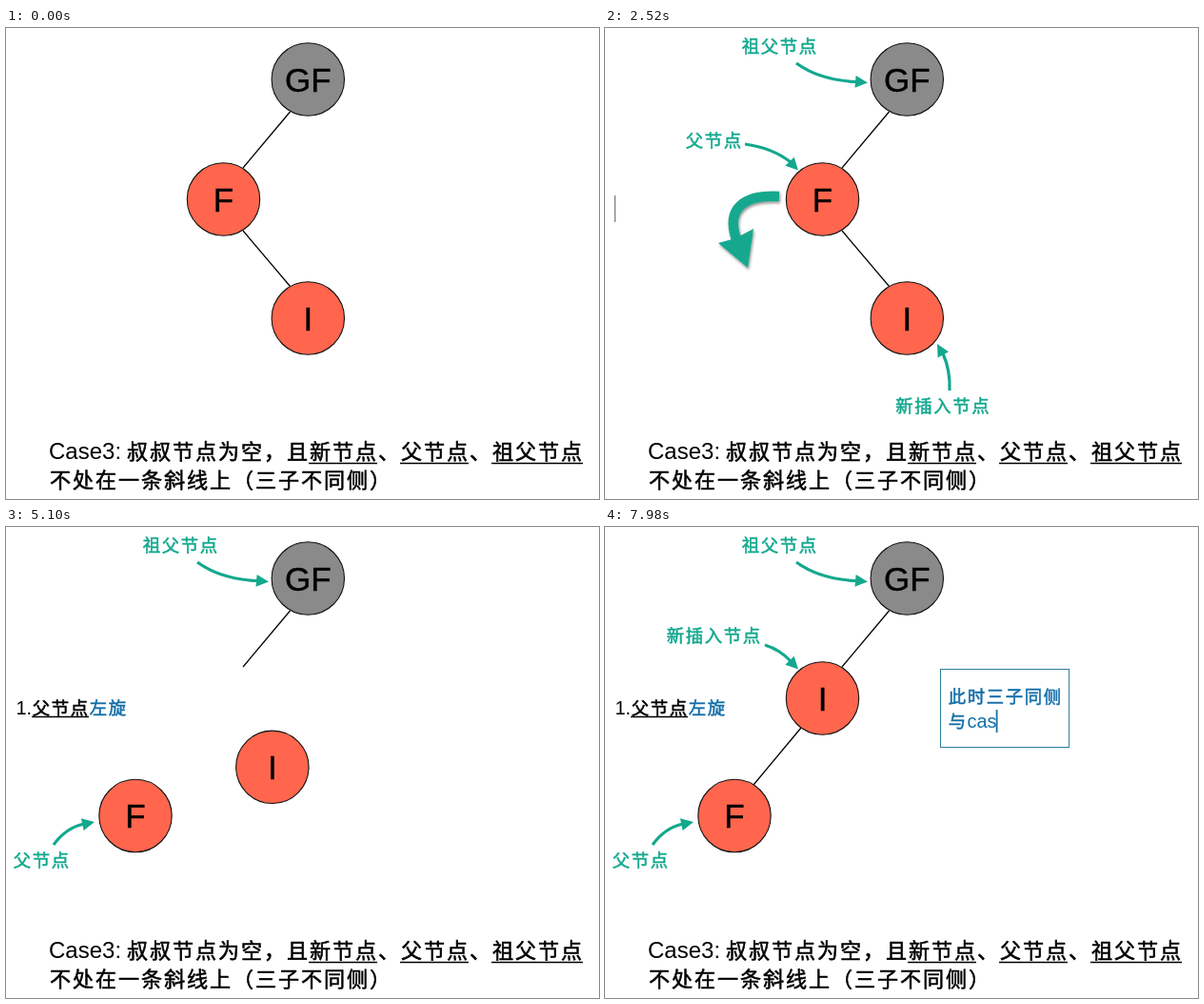
Animation of 623 by 495 pixels, one loop 8 s. Source, as an HTML page:

```html
<!DOCTYPE html>
<html lang="zh-CN">
<head>
<meta charset="utf-8">
<title>红黑树插入</title>
<style>
  html, body { margin: 0; width: 100%; height: 100%; overflow: hidden; background: #fff; }
  svg { display: block; width: 623px; height: 495px; }
  .cjk { font-family: "Noto Sans CJK SC", "Noto Sans CJK", "Noto Sans SC", sans-serif; white-space: pre; }
  .latin { font-family: "Liberation Sans", Arial, sans-serif; }
</style>
</head>
<body>
<svg id="stage" viewBox="0 0 623 495">
  <defs>
    <filter id="soft" x="-40%" y="-40%" width="180%" height="180%"><feGaussianBlur stdDeviation="9"/></filter>
    <filter id="shade" x="-30%" y="-30%" width="160%" height="160%">
      <feDropShadow dx="1" dy="2" stdDeviation="1.8" flood-color="#000" flood-opacity=".45"/>
    </filter>
  </defs>
</svg>
<script>
const LOOP = 8000, STEP = 60;
const TEAL = '#13a88e', BLUE = '#146fa9', RED = '#ff664d', GRAY = '#8a8a8a';
const stage = document.getElementById('stage');

function add(parent, tag, attrs = {}, text) {
  const el = document.createElementNS('http://www.w3.org/2000/svg', tag);
  for (const key in attrs) el.setAttribute(key, attrs[key]);
  if (text) el.textContent = text;
  return parent.appendChild(el);
}
const group = () => add(stage, 'g');
const line = (parent, x1, y1, x2, y2, stroke = '#000', width = 1.3) =>
  add(parent, 'line', { x1, y1, x2, y2, stroke, 'stroke-width': width });

// Chinese glyphs sit centred in square cells of the given pitch.
function cjk(parent, x, cy, str, pitch, fill) {
  const size = pitch * 0.92;
  return add(parent, 'text', {
    class: 'cjk', x: x + pitch * 0.04, y: cy + size * 0.38, fill, stroke: fill, 'stroke-width': 0.55,
    'font-size': size, 'letter-spacing': pitch - size
  }, str);
}
const latin = (parent, x, y, str, size, fill, extra = {}) =>
  add(parent, 'text', { class: 'latin', x, y, fill, 'font-size': size, ...extra }, str);

function label(text, x, cy, body, tipX, tipY, angle, centerX, centerY) {
  const el = group();
  cjk(el, x, cy, text, 20, TEAL);
  add(el, 'path', { d: body, fill: 'none', stroke: TEAL, 'stroke-width': 3.2 });
  add(el, 'path', { d: 'M0 0L-13 -6.5L-13 6.5Z', fill: TEAL, transform: `translate(${tipX} ${tipY}) rotate(${angle})` });
  return { el, centerX, centerY };
}

function node(text, fill) {
  const el = group();
  add(el, 'circle', { r: 38.2, fill, stroke: '#111', 'stroke-width': 1.1 });
  latin(el, 0, 12.7, text, 35, '#000', { 'text-anchor': 'middle', stroke: '#000', 'stroke-width': 0.4 });
  return el;
}

const clamp = v => Math.max(0, Math.min(1, v));
const part = (t, start, length) => clamp((t - start) / length);
const ease = p => (1 - Math.cos(Math.PI * p)) / 2;
const mix = (a, b, p) => a + (b - a) * p;
const fade = (el, value) => el.setAttribute('opacity', value);
const place = (el, x, y) => el.setAttribute('transform', `translate(${x} ${y})`);

// Springy entrance: overshoot, slight undershoot, rest.
function popScale(p) {
  if (p < 0.45) return 1.09 * Math.sin(p / 0.45 * Math.PI / 2);
  if (p < 0.75) return mix(1.09, 0.96, ease((p - 0.45) / 0.3));
  return mix(0.96, 1, ease((p - 0.75) / 0.25));
}
function pop({ el, centerX, centerY }, t, start) {
  const s = popScale(part(t, start, 500));
  el.setAttribute('transform', `translate(${centerX} ${centerY}) scale(${s}) translate(${-centerX} ${-centerY})`);
  fade(el, s > 0 ? 1 : 0);
}

function makeSmoke(x, y, rx, ry, tilt) {
  const el = group();
  const cloud = add(el, 'ellipse', { rx, ry, fill: '#d5dddd', filter: 'url(#soft)' });
  return t => {
    const s = mix(0.55, 1, t);
    cloud.setAttribute('transform', `translate(${x} ${y}) rotate(${tilt}) scale(${s})`);
    fade(el, t > 0 && t < 1 ? 0.9 * Math.sin(Math.PI * t) : 0);
  };
}

const ADVANCE = { '1': 11.1, '.': 5.6, c: 10, a: 11.1, s: 10 };
function typist(pieces, caret, height) {
  return (count, caretOn) => {
    let left = count, caretX = pieces[0].x, caretY = pieces[0].cy;
    for (const p of pieces) {
      const shown = p.text.slice(0, Math.max(0, left));
      p.el.textContent = shown;
      if (shown) {
        caretX = p.x + [...shown].reduce((sum, ch) => sum + (ADVANCE[ch] || 20), 0);
        caretY = p.cy;
      }
      if (p.rule) p.rule.setAttribute('x2', p.x + shown.length * 20);
      left -= p.text.length;
    }
    place(caret, caretX, caretY - height / 2);
    fade(caret, caretOn ? 1 : 0);
  };
}

// Caption
latin(stage, 45, 453, 'Case3:', 24, '#000');
cjk(stage, 126, 445, '叔叔节点为空，且新节点、父节点、祖父节点', 24, '#000');
cjk(stage, 45, 475, '不处在一条斜线上（三子不同侧）', 24, '#000');
for (const [from, to] of [[318, 390], [414, 486], [510, 606]]) line(stage, from, 457.5, to, 457.5, '#000', 1.5);

// Tree
const smokeF = makeSmoke(136, 118, 92, 44, 16);
const smokeI = makeSmoke(355, 366, 62, 42, 40);
line(stage, 298.5, 88, 249, 147);
const oldEdge = line(stage, 249, 213, 298.5, 271.5);
const newEdge = line(stage, 206, 211, 156, 271);
place(node('GF', GRAY), 317.3, 54);
const nodeF = node('F', RED);
const nodeI = node('I', RED);

// Labels with arrows
const labelI = label('新插入节点', 304.5, 397, 'M362 381Q363 360 355 342', 349, 332, -119, 354, 369);
const labelF = label('父节点', 84, 118, 'M147 122Q176 126 195 141', 203, 149.5, 46, 144, 128);
const labelGF = label('祖父节点', 143, 19.5, 'M201 37Q226 55 264 56.5', 276, 57.5, 5, 209, 34);
const lowF = label('父节点', 7, 350, 'M50 334Q63 316 82 312', 93, 310, -12, 50, 334);
const highI = label('新插入节点', 64, 114, 'M168 124Q184 129 195 141', 203, 149.5, 46, 134, 127);

// Rotation arrow
const turn = { el: group(), centerX: 151, centerY: 211 };
const turnShape = add(turn.el, 'g', { filter: 'url(#shade)' });
add(turnShape, 'path', { d: 'M183 177C145 175 127 190 138 222', fill: 'none', stroke: TEAL, 'stroke-width': 10.5 });
add(turnShape, 'path', { d: 'M119 226L137 221L156 211L150 252Z', fill: TEAL });

// Typed notes
const stepCaret = add(stage, 'path', { d: 'M0 0V28', stroke: '#777', 'stroke-width': 1.2 });
const typeStep = typist([
  { text: '1.', x: 10.5, cy: 190, el: latin(stage, 10.5, 197, '', 20, '#000') },
  { text: '父节点', x: 27, cy: 190, el: cjk(stage, 27, 190, '', 20, '#000'), rule: line(stage, 27, 199.5, 27, 199.5) },
  { text: '左旋', x: 87, cy: 190, el: cjk(stage, 87, 190, '', 20, BLUE) }
], stepCaret, 28);

const note = group();
add(note, 'rect', { x: 352.5, y: 149.5, width: 135, height: 82, fill: '#fff', stroke: '#2d7f9c' });
const noteCaret = add(note, 'path', { d: 'M0 0V24', stroke: BLUE, 'stroke-width': 1.8 });
const typeNote = typist([
  { text: '此时三子同侧', x: 360, cy: 178, el: cjk(note, 360, 178, '', 20, BLUE) },
  { text: '与', x: 360, cy: 204, el: cjk(note, 360, 204, '', 20, BLUE) },
  { text: 'cas', x: 380.5, cy: 204, el: latin(note, 380.5, 210.5, '', 20, BLUE) }
], noteCaret, 24);

const typed = (t, start, step) => t < start ? 0 : Math.floor((t - start) / step) + 1;

function render(t) {
  pop(labelI, t, 60);
  pop(labelF, t, 465);
  pop(labelGF, t, 1060);
  pop(turn, t, 1800);
  typeStep(typed(t, 2580, 90), t >= 2460 && t < 3240);

  const goneF = part(t, 3240, 300);
  if (goneF > 0) {
    fade(labelF.el, 1 - goneF);
    fade(turn.el, 1 - goneF);
  }
  smokeF(part(t, 3240, 480));

  // F swings left and down along a quadratic curve.
  const f = ease(part(t, 3630, 400)), g = 1 - f;
  place(nodeF, g * g * 228.5 + 2 * g * f * 134 + f * f * 136, g * g * 180 + 2 * g * f * 170 + f * f * 303.5);
  pop(lowF, t, 4020);

  const goneI = part(t, 4560, 300);
  if (goneI > 0) fade(labelI.el, 1 - goneI);
  fade(oldEdge, 1 - goneI);
  smokeI(part(t, 4560, 480));

  const i = ease(part(t, 4920, 400));
  place(nodeI, mix(317.3, 228.5, i), mix(305, 180, i));
  pop(highI, t, 5320);

  const drawn = part(t, 5700, 360);
  newEdge.setAttribute('x2', mix(206, 156, drawn));
  newEdge.setAttribute('y2', mix(211, 271, drawn));

  fade(note, part(t, 6600, 180));
  typeNote(typed(t, 6840, 120), true);
}

const began = performance.now();
function tick() {
  const t = (performance.now() - began) % LOOP;
  render(Math.floor(t / STEP) * STEP);
  requestAnimationFrame(tick);
}
tick();
</script>
</body>
</html>
```
